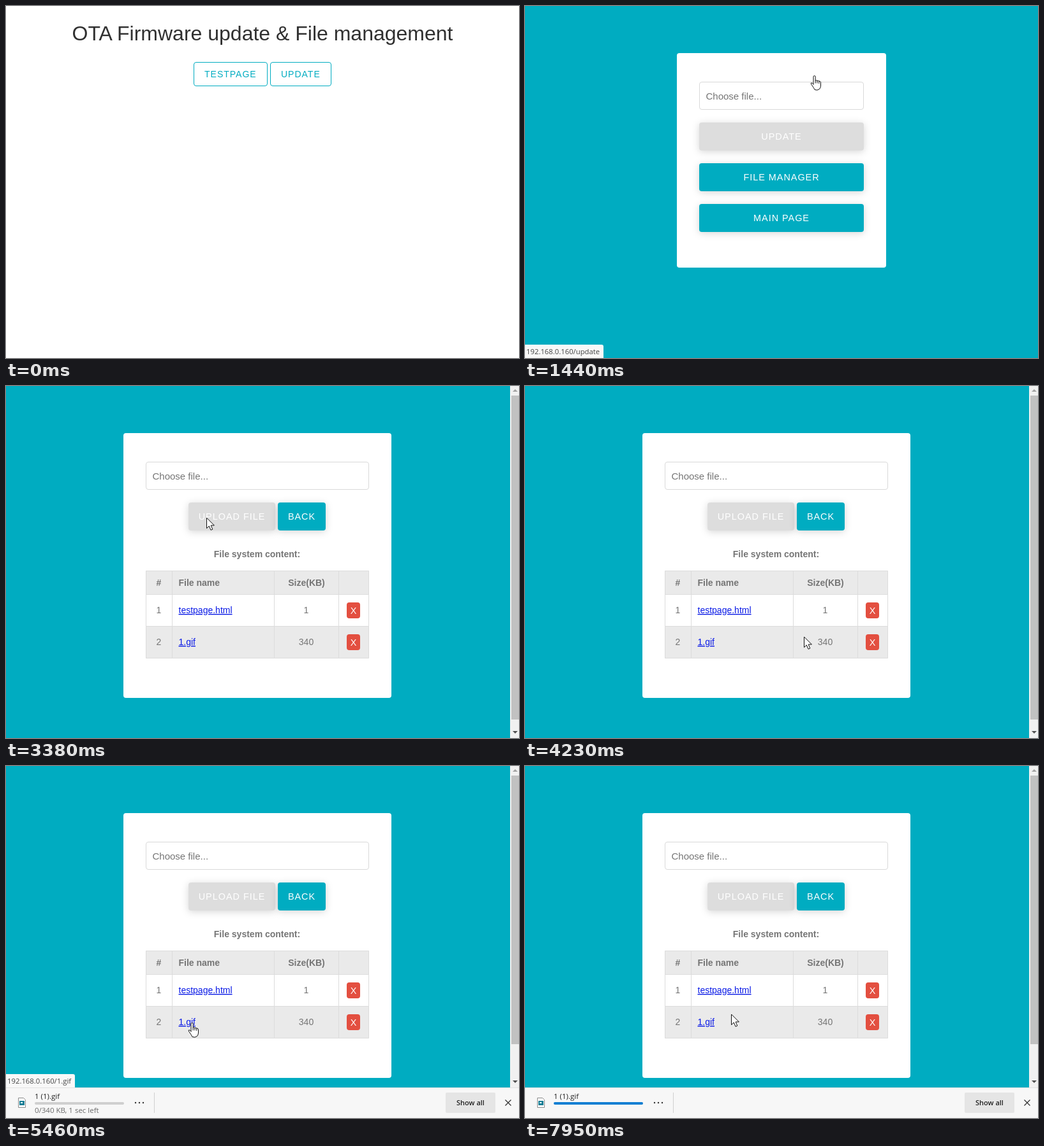
These frames come from a looping animation (804 by 553 pixels, 8 s). An HTML page:

```html
<!DOCTYPE html>
<html lang="en">
<head>
<meta charset="utf-8">
<title>OTA update</title>
<style>
  html, body { margin: 0; width: 100%; height: 100%; overflow: hidden; background: #fff; }
  svg { display: block; width: 804px; height: 553px; font: 14px "Liberation Sans", Arial, sans-serif; }
  .ui { font-family: "Open Sans", "Noto Sans", sans-serif; font-size: 11.5px; }
  .mid { text-anchor: middle; }
  .btn { font-size: 14.4px; letter-spacing: 1px; fill: #fff; text-anchor: middle; }
  .outline { letter-spacing: 1px; fill: #00acc1; }
  .soft { filter: drop-shadow(0 2px 6px rgba(0, 0, 0, .16)); }
  .pressed { filter: drop-shadow(0 2px 3px rgba(0, 0, 0, .4)); }
  .grey { fill: #757575; }
  .bold { font-weight: 700; }
  .link { fill: #0b1be6; text-decoration: underline; }
  .cursor { fill: #fff; stroke: #111; stroke-linejoin: round; stroke-linecap: round; }
</style>
</head>
<body>
<svg id="stage" viewBox="0 0 804 553"></svg>
<script>
const TEAL = '#00acc1', DARK_TEAL = '#0097a7';
const $ = id => document.getElementById(id);

const rect = (x, y, w, h, fill, rest = '') =>
  `<rect x="${x}" y="${y}" width="${w}" height="${h}" fill="${fill}" ${rest}/>`;
const text = (x, y, str, cls = '', rest = '') =>
  `<text x="${x}" y="${y}" class="${cls}" ${rest}>${str}</text>`;
const button = (x, y, w, label, fill = TEAL, id = '') =>
  rect(x, y, w, 44, fill, `rx="4" class="soft" ${id && `id="${id}"`}`) +
  text(x + w / 2, y + 27, label, 'btn');
const card = (x, w, h) =>
  rect(0, 0, 804, 553, TEAL) + rect(x, 74, w, h, '#fff', 'rx="4"') +
  rect(x + 35.5, 119.5, w - 71, 43, '#fff', 'rx="3.5" stroke="#d9d9d9"') +
  text(x + 45.5, 147, 'Choose file...', 'grey', 'font-size="15"');
const outlineBox = (x, w, id) =>
  rect(x + .5, 88.5, w - 1, 37, '#fff', `rx="3.5" stroke="${TEAL}" id="${id}"`);

const fileRow = (y, number, name, size) =>
  text(239.5, y + 30, number, 'grey mid') + text(270.5, y + 30, name, 'link') +
  text(470.5, y + 30, size, 'grey mid') +
  rect(534, y + 13, 21, 25, '#e34f40', 'rx="4"') +
  text(544.5, y + 31, 'X', 'mid', 'fill="#fff" font-size="14.4"');

const table =
  rect(219, 290, 350, 38, '#eaeaea') + rect(219, 378, 350, 50, '#eaeaea') +
  `<path d="M219.5 290.5H568.5V427.5H219.5ZM219.5 327.5H568.5M219.5 377.5H568.5
    M260.5 290V428M420.5 290V428M521.5 290V428" fill="none" stroke="#dcdcdc"/>` +
  text(239.5, 314, '#', 'grey bold mid') + text(270.5, 314, 'File name', 'grey bold') +
  text(471, 314, 'Size(KB)', 'grey bold mid') +
  fileRow(327, 1, 'testpage.html', 1) + fileRow(377, 2, '1.gif', 340);

const scrollbar =
  rect(790, 0, 14, 553, '#f1f1f1') + rect(792, 15, 12, 509, '#c1c1c1', 'id="thumb"') +
  '<path d="M794 9h8l-4-4z" fill="#a3a3a3"/>' +
  '<path id="scrollDown" d="M794 542h8l-4 4z" fill="#505050"/>';

const shelf =
  rect(0, 505, 804, 49, '#f7f7f7') + rect(0, 505, 804, 1, '#e2e2e2') +
  '<path d="M19.5 521.5h8l3 3v12h-11z" fill="#fff" stroke="#8a8a8a"/>' +
  rect(21, 526, 8, 7, '#167f96') + rect(23, 528, 3, 2, '#fff') +
  text(45, 523, '1 (1).gif', 'ui', 'fill="#222"') +
  rect(45, 528, 140, 4, '#cfcfcf', 'rx="2"') +
  rect(45, 528, 0, 4, '#0078d4', 'rx="2" id="bar"') +
  text(45, 545, '', 'ui', 'fill="#6a6a6a" id="count"') +
  [203, 209, 215].map(x => `<circle cx="${x}" cy="529" r="1.2" fill="#333"/>`).join('') +
  rect(232, 513, 1, 32, '#d0d0d0') + rect(689, 513, 78, 32, '#e5e5e5', 'rx="2"') +
  text(728, 533, 'Show all', 'ui mid', 'fill="#222" style="font-size:11px;font-weight:600"') +
  '<path d="M782.5 524.5l9 9m0-9l-9 9" stroke="#333" stroke-width="1.3"/>';

$('stage').innerHTML = `
<g id="home">
  ${rect(0, 0, 804, 553, '#fff')}
  ${text(402, 54, 'OTA Firmware update &amp; File management', 'mid', 'font-size="32" fill="#303030"')}
  ${outlineBox(294, 116, 'testBox')}${text(311, 112, 'TESTPAGE', 'outline')}
  ${outlineBox(414, 96, 'updateBox')}${text(431, 112, 'UPDATE', 'outline', 'id="updateLabel"')}
</g>
<g id="update">
  ${card(238, 328, 337)}
  ${button(273, 183, 258, 'UPDATE', '#ddd')}
  ${button(273, 247, 258, 'FILE MANAGER', TEAL, 'manager')}
  ${button(273, 311, 258, 'MAIN PAGE')}
</g>
<g id="files">
  ${card(184, 420, 416)}
  ${button(286, 183, 136, 'UPLOAD FILE', '#ddd')}${button(426, 183, 75, 'BACK')}
  ${text(393.5, 269, 'File system content:', 'grey bold mid')}
  ${table}${scrollbar}
</g>
<g id="status">
  <path id="bubble" fill="#f8f8f8"/>
  ${text(2, 547, '', 'ui', 'fill="#444" style="font-size:11.3px" id="address"')}
</g>
<g id="shelf">${shelf}</g>
<path id="arrow" class="cursor" d="M.5.5V16.6L4.3 13 7 19.3 9.8 18.1 7.1 12H12Z"/>
<path id="hand" class="cursor" d="M-1 14V2.2a1.6 1.6 0 0 1 3.2 0V8.2q1.4-1 2.8.3 1.5-.8 2.8.6 2.3-.4 2.7 2V16q0 3-2 5.5-3.5 2.8-7.5 1Q0 20-4 14.5-5.4 12.4-4.4 11.8-3 11.2-1 14M2.2 8.2V12M5 8.5V12M7.8 9.1V12.5"/>`;

// time, x, y of the pointer's tip
const PATH = [
  [130, 700, 407], [210, 600, 300], [290, 553, 242], [450, 553, 242], [680, 485, 150],
  [830, 453, 109], [1600, 453, 109], [1830, 412, 220], [1980, 396, 279], [2925, 395, 279],
  [3150, 355, 220], [3270, 328, 191], [3380, 314, 207], [3540, 270, 270], [3620, 263, 325],
  [3760, 285, 391], [3920, 325, 408], [4150, 445, 416], [4300, 430, 375], [4400, 385, 358],
  [4610, 298, 390], [4690, 291, 396], [4850, 291, 402], [5930, 291, 403], [6070, 333, 406],
  [6550, 333, 406], [6900, 334, 400], [7390, 323, 390], [8000, 323, 390],
];
const ramp = (t, from, to) => Math.min(1, Math.max(0, (t - from) / (to - from)));
const within = (t, from, to) => t >= from && t < to;
const show = (id, on) => $(id).style.display = on ? '' : 'none';

function pointer(t) {
  const i = PATH.findIndex(p => p[0] > t);
  if (i < 1) return PATH[0].slice(1);
  const [a, b] = [PATH[i - 1], PATH[i]], k = ramp(t, a[0], b[0]);
  return [1, 2].map(n => a[n] + (b[n] - a[n]) * k);
}

function drawStatus(t, lift) {
  const first = t < 2600, w = first ? 123 : 108;
  $('address').textContent = '192.168.0.160/' + (first ? 'update' : '1.gif');
  $('bubble').setAttribute('d', `M0 532H${w - 3}q3 0 3 3V553H0Z`);
  $('status').setAttribute('transform', `translate(0 ${-lift})`);
  $('status').style.opacity = first
    ? ramp(t, 910, 1130) - ramp(t, 1600, 1820)
    : ramp(t, 4690, 4900) - ramp(t, 6230, 6450);
}

function drawDownload(t, lift) {
  $('shelf').setAttribute('transform', `translate(0 ${48 - lift})`);
  $('thumb').setAttribute('height', 509 - 87 * lift / 48);
  $('scrollDown').setAttribute('transform', `translate(0 ${-lift})`);
  // the counter refreshes every 460 ms
  const kb = Math.min(340, Math.max(0, 7 + 100 * Math.floor((t - 5530) / 460)));
  const done = kb === 340;
  $('bar').setAttribute('width', 140 * kb / 340);
  $('bar').style.opacity = done ? .93 + .05 * Math.sin(t / 120) : 1;
  $('count').textContent = done ? '' : `${kb}/340 KB, ${kb < 300 ? '1 sec' : '0 secs'} left`;
}

function draw(t) {
  show('home', t < 1440);
  show('update', within(t, 1440, 2600));
  show('files', t >= 2600);

  const hover = t >= 750;
  $('updateBox').setAttribute('fill', t >= 1130 ? DARK_TEAL : hover ? TEAL : '#fff');
  $('updateLabel').style.fill = hover ? '#fff' : TEAL;
  $('manager').setAttribute('fill', t >= 1900 ? DARK_TEAL : TEAL);
  $('manager').setAttribute('class', t >= 2210 ? 'pressed' : 'soft');

  const lift = 48 * ramp(t, 5150, 5400);
  show('shelf', lift > 0);
  drawStatus(t, lift);
  drawDownload(t, lift);

  const hand = within(t, 750, 1670) || within(t, 1900, 2600) || within(t, 4690, 6030);
  const at = `translate(${pointer(t).map(Math.round).join(' ')})`;
  show('hand', hand);
  show('arrow', !hand && t >= 130);
  $('hand').setAttribute('transform', at);
  $('arrow').setAttribute('transform', at);
}

const start = performance.now();
(function tick() {
  draw((performance.now() - start) % 8000);
  requestAnimationFrame(tick);
})();
</script>
</body>
</html>
```
